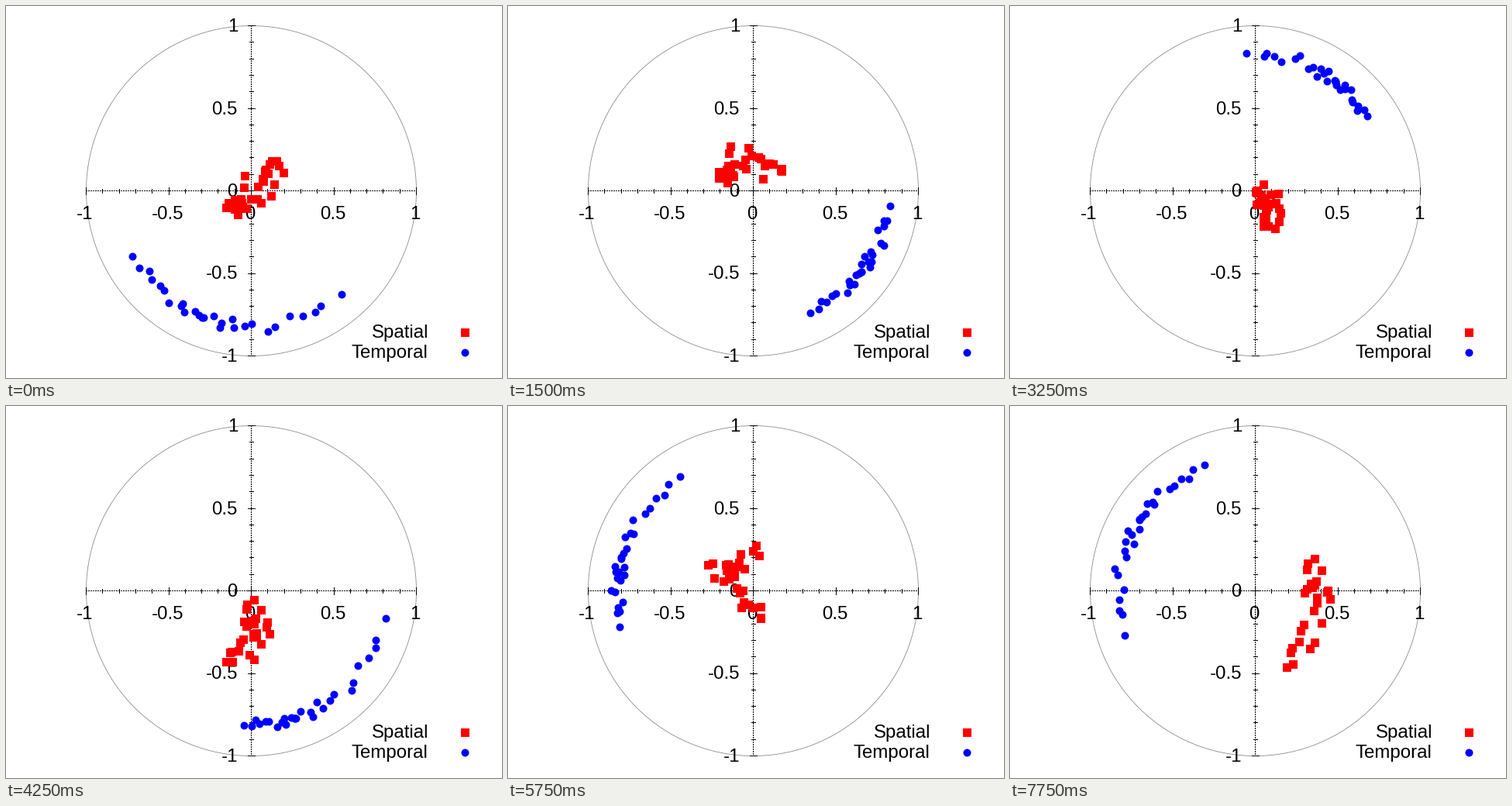
These frames come from a looping animation (640 by 480 pixels, 8000 ms). A matplotlib script:

```python
import numpy as np
import matplotlib.pyplot as plt
from matplotlib.animation import FuncAnimation
from matplotlib.patches import Circle

W, H, DPI = 640, 480, 100
PX = 72 / DPI  # one pixel in points
CX, CY, R = 316, 238, 213
FRAMES, INTERVAL = 32, 250
DOTS = 28

# step: temporal arc (start, middle, end; unwrapped degrees),
#       spatial trail (start, bend, end; pixels)
POSES = {
    0: ((-151, -108, -48), ((285, 262), (325, 245), (350, 195))),
    4: ((25, 62, 97), ((238, 225), (270, 185), (340, 190))),
    9: ((-200, -180, -160), ((325, 222), (348, 222), (372, 232))),
    17: ((-453, -429, -371), ((312, 258), (332, 295), (285, 325))),
    21: ((-305, -245, -214), ((322, 185), (272, 218), (305, 262))),
    26: ((-136, -110, -89), ((308, 195), (272, 222), (360, 280))),
    31: ((-248, -209, -160), ((385, 205), (405, 252), (358, 332))),
}
STEPS = list(POSES)
ARCS, TRAILS = (np.array(part, float) for part in zip(*POSES.values()))

# Every dot keeps its own place along the shape and its own offset
rng = np.random.default_rng(7)
u = np.linspace(-1, 1, DOTS)
arc_place = 0.65 * u + 0.35 * u**3  # sparser towards both ends
arc_jitter = rng.normal(0, 1.5, DOTS)
radius = R * (0.82 + np.clip(rng.normal(0, 0.022, DOTS), -0.04, 0.04))
trail_jitter = np.clip(rng.normal(0, 10, (2, DOTS)), -20, 20)


def pose(keys, step):
    """Linear blend of the key poses around a step."""
    i = min(np.searchsorted(STEPS, step, side="right"), len(STEPS) - 1)
    a, b = STEPS[i - 1], STEPS[i]
    t = (step - a) / (b - a)
    return keys[i - 1] * (1 - t) + keys[i] * t


def along(knots, place):
    """Values at places -1..1 between start, middle and end."""
    return np.interp(place, [-1, 0, 1], knots)


plt.rcParams["font.family"] = "Liberation Sans"
fig = plt.figure(figsize=(W / DPI, H / DPI), dpi=DPI, facecolor="white")
ax = fig.add_axes([0, 0, 1, 1])
ax.set_xlim(0, W)
ax.set_ylim(H, 0)
ax.axis("off")


def line(x, y, **style):
    ax.plot(x, y, color="black", lw=PX, antialiased=False,
            solid_capstyle="butt", **style)


def label(x, y, text, ha):
    ax.text(x, y, text, ha=ha, va="baseline", fontsize=24 * PX)


def markers(shape, color, size, x=(), y=()):
    return ax.plot(x, y, shape, color=color, ms=size * PX, mew=0, zorder=4)[0]


ax.add_patch(Circle((CX + 0.5, CY + 0.5), R, fill=False, ec="#808080",
                    lw=0.75 * PX))
dotted = (0, (2, 2))
line([CX - R, CX + R], [CY, CY], ls=dotted)
line([CX, CX], [CY - R, CY + R], ls=dotted)

for k in range(-10, 11):
    size = 4.5 if k % 5 == 0 else 2.5
    x, y = CX + R * k / 10, CY - R * k / 10
    line([x, x], [CY - size, CY + size])
    line([CX - size, CX + size], [y, y])
    if k % 5 == 0:
        text = f"{k / 10:g}"
        label(x - 1, 275, text, "center")
        label(299, y + 8, text, "right")

label(545, 428, "Spatial", "right")
label(544, 454, "Temporal", "right")
markers("s", "red", 11, [592], [421])
markers("o", "blue", 10, [592], [447])

spatial = markers("s", "red", 11)
temporal = markers("o", "blue", 10)


def update(step):
    xs, ys = pose(TRAILS, step).T
    spatial.set_data(along(xs, u) + trail_jitter[0],
                     along(ys, u) + trail_jitter[1])
    angle = np.radians(along(pose(ARCS, step), arc_place) + arc_jitter)
    temporal.set_data(CX + radius * np.cos(angle),
                      CY - radius * np.sin(angle))
    return spatial, temporal


anim = FuncAnimation(fig, update, frames=FRAMES, interval=INTERVAL,
                     repeat=True, repeat_delay=0)
plt.show()
```
